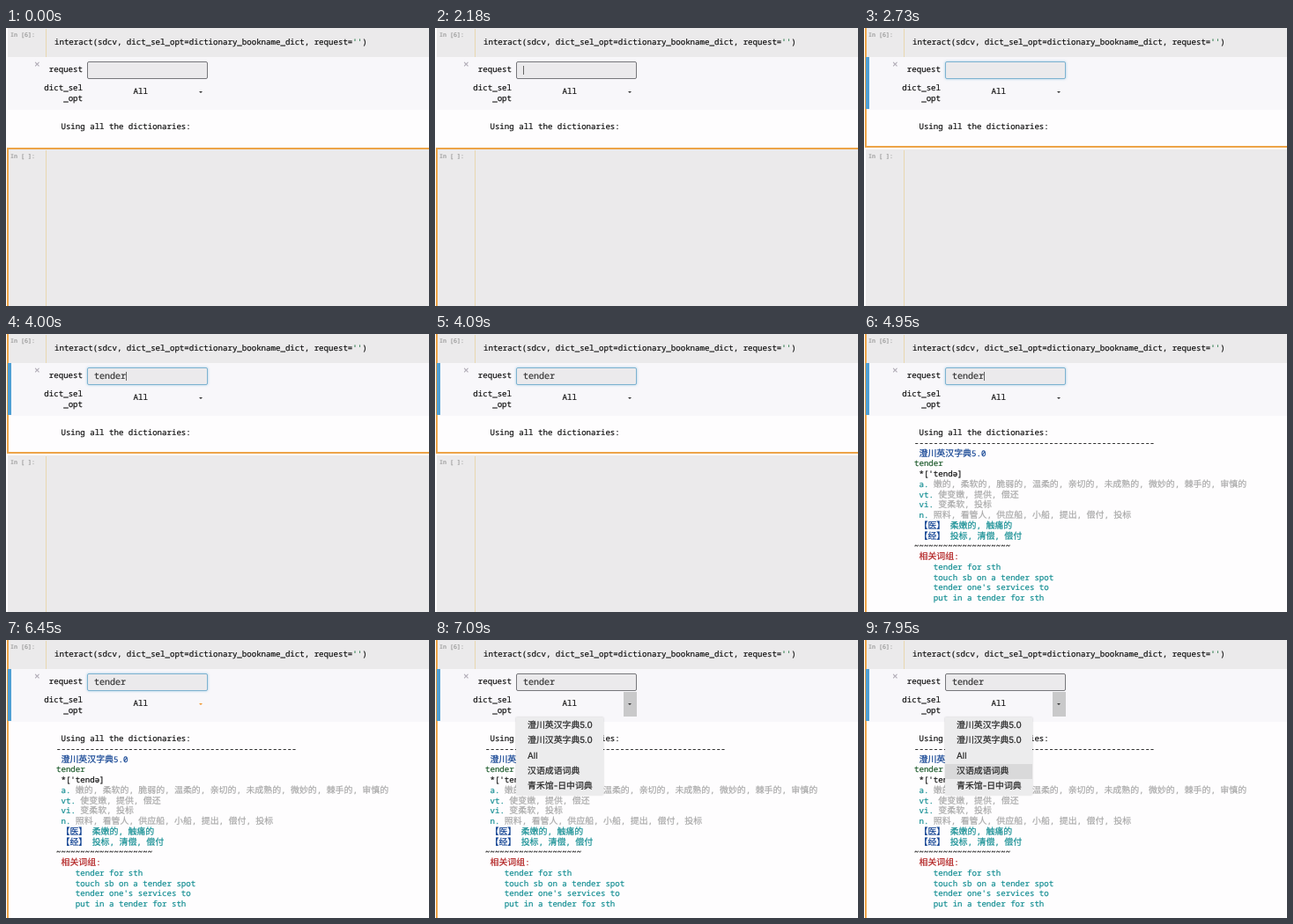
Write an HTML page that moves like this. It is 480 by 316 pixels and loops after 8000 ms.

```html
<!DOCTYPE html>
<html lang="zh-CN">
<head>
<meta charset="utf-8">
<title>Dictionary widget</title>
<style>
html, body { margin: 0; width: 100%; height: 100%; overflow: hidden; background: #fff; }
#stage { position: relative; width: 480px; height: 316px; overflow: hidden; background: #fefdfe;
  font: 9.1px/12px "Noto Sans Mono", monospace; color: #111; text-rendering: geometricPrecision;
  -webkit-text-stroke: 0.2px currentColor; }
#stage div, #stage pre { position: absolute; box-sizing: border-box; margin: 0; white-space: pre; }
#stage pre { font: inherit; line-height: 11.77px; }
.han { font: 9.93px/0 "Noto Sans CJK SC", "Noto Sans CJK", sans-serif; }
i { font-style: normal; }
.cyan { color: #128d92; } .gray { color: #a8a8a8; } .blue { color: #0a3d8f; }
.green { color: #1c5a2b; } .red { color: #b01c1c; }
.code { left: 2px; width: 478px; background: #ebeaeb; }
.gutter { left: 43px; top: 1px; bottom: 0; border-left: 1px solid #e8d8b0; }
.prompt { left: 5px; font-size: 6.67px; color: #999; }
.label { right: 393px; text-align: right; }
.selected { border: 2px solid #eda448; }
#widgets { left: 2px; top: 33px; width: 478px; height: 60px; background: #f8f7fa; }
#bar { left: 2px; top: 33px; width: 4px; height: 59px; background: #4f9fd4; }
#input { left: 92px; top: 38px; width: 137px; height: 20px; padding-left: 7px; border: 1px solid;
  border-radius: 2px; background: #ebeaec; font-size: 10px; line-height: 16px; color: #333; }
#caret { top: 4px; width: 1px; height: 10px; background: #666; }
#button { left: 214px; top: 59px; width: 15px; height: 28px; background: #c9c9ca; }
#arrow { left: 219px; top: 71.500px; border: 2.5px solid transparent; border-bottom: 0; }
#menu { left: 92px; top: 88px; width: 99px; height: 88px; background: #ececed;
  box-shadow: 0 0 2px #0003; }
#menu div { left: 0; width: 99px; height: 17.4px; padding-left: 13px;
  font: 9.9px/17.4px Inter, "Noto Sans CJK SC", "Noto Sans CJK", sans-serif; color: #222; }
</style>
</head>
<body>
<div id="stage">
  <div class="code" style="top:0;height:33px"><div class="gutter"></div></div>
  <div class="prompt" style="top:2px">In [6]:</div>
  <div style="left:55px;top:9.500px">interact(sdcv, dict_sel_opt=dictionary_bookname_dict, request=<i style="color:#1f7440">''</i>)</div>
  <div id="widgets"></div>
  <pre id="output" style="left:57px;top:106px"></pre>
  <div id="next" style="left:0;top:136px;width:480px;height:200px">
    <div class="code" style="top:2px;height:198px"><div class="gutter"></div></div>
    <div class="prompt" style="top:4px">In [ ]:</div>
    <div id="nextFrame" class="selected" style="left:1px;top:0;width:490px;height:210px"></div>
  </div>
  <div id="cellFrame" class="selected" style="left:1px;top:-5px;width:490px"></div>
  <div id="bar"></div>
  <div style="left:32px;top:36px;font-size:11px;color:#aaa5b0">×</div>
  <div class="label" style="top:40.500px">request</div>
  <div class="label" style="top:61.500px;line-height:12.5px">dict_sel
_opt</div>
  <div id="input"><span id="typed"></span><div id="caret"></div></div>
  <div style="left:144.500px;top:66px">All</div>
  <div id="button"></div>
  <div id="arrow"></div>
  <div id="menu"></div>
</div>
<script>
const LOOP = 8000, LINE = 11.77, WORD = 'tender';
const FOCUS = 2230, HOVER = 6410, OPEN = 6700;
const KEYS = [3000, 3140, 3280, 3420, 3560, 3700];
const MENU_HOVERS = [7250, 7400, 7550, 7750];
const $ = id => document.getElementById(id);
const paint = (color, text) => `<i class="${color}">${text}</i>`;
const sense = (kind, text) => ` ${paint('cyan', kind + '.')} ${paint('gray', text)}`;
const field = (name, text) => ` ${paint('blue', `【${name}】`)} ${paint('cyan', text)}`;
const entry = (word, sound, ...rest) => ['-'.repeat(50), ' ' + paint('blue', '澄川英汉字典5.0'),
  paint('green', word), ` *[${sound}]`, ...rest];

const results = [
  { at: 0, lines: [] },
  { at: 4400, lines: entry('tend', 'tend',
    sense('vi', '走向, 有某种的倾向, 易于, 照顾, 注意'),
    sense('vt', '照料, 护理')) },
  { at: 4770, lines: entry('tender', "'tendə",
    sense('a', '嫩的, 柔软的, 脆弱的, 温柔的, 亲切的, 未成熟的, 微妙的, 棘手的, 审慎的'),
    sense('vt', '使变嫩, 提供, 偿还'),
    sense('vi', '变柔软, 投标'),
    sense('n', '照料, 看管人, 供应船, 小船, 提出, 偿付, 投标'),
    field('医', '柔嫩的, 触痛的'),
    field('经', '投标, 清偿, 偿付'),
    '~'.repeat(20),
    ' ' + paint('red', '相关词组:'),
    ...['tender for sth', 'touch sb on a tender spot', "tender one's services to", 'put in a tender for sth']
      .map(phrase => '    ' + paint('cyan', phrase))) },
];
for (const result of results) {
  result.html = [' Using all the dictionaries:', ...result.lines].join('\n')
    .replace(/[\u3010\u3011\u4e00-\u9fff]+/g, '<span class="han">$&</span>');
}

const items = ['澄川英汉字典5.0', '澄川汉英字典5.0', 'All', '汉语成语词典', '青禾馆-日中词典'].map((name, i) => {
  const item = document.createElement('div');
  item.textContent = name;
  item.style.top = i * 17.4 + 0.8 + 'px';
  $('menu').append(item);
  return item;
});

const show = (id, on) => { $(id).style.visibility = on ? 'visible' : 'hidden'; };
const ramp = (t, start) => Math.min(1, Math.max(0, (t - start) / 200));
const mix = (a, b, k) => `rgb(${a.map((v, i) => v + (b[i] - v) * k)})`;
const mod = (a, n) => ((a % n) + n) % n;

function caretOn(t) {
  if (t < 2180 || t >= OPEN) return false;
  if (t < 3000) return t < 2700;
  return t < KEYS[5] || mod(t - 4480, 1000) < 540;
}

let shown;
function render(t) {
  const result = results.findLast(r => t >= r.at);
  if (result !== shown) {
    shown = result;
    $('output').innerHTML = result.html;
  }
  const extra = result.lines.length * LINE;
  $('next').style.top = 136 + extra + 'px';
  $('cellFrame').style.height = 141 + extra + 'px';

  const active = t >= FOCUS;
  show('cellFrame', active);
  show('bar', active);
  show('nextFrame', !active);

  const glow = ramp(t, FOCUS) - ramp(t, OPEN);
  $('input').style.borderColor = mix([118, 118, 122], [125, 178, 208], glow);
  $('input').style.boxShadow = `0 0 3px rgba(102,175,215,${0.6 * glow})`;
  const count = KEYS.filter(key => t >= key).length;
  $('typed').textContent = WORD.slice(0, count);
  $('caret').style.left = 7 + count * 6 + 'px';
  show('caret', caretOn(t));

  const open = t >= OPEN;
  show('button', open);
  show('menu', open);
  $('arrow').style.borderTopColor = t >= HOVER && !open ? '#f0952c' : '#333';
  const hovered = MENU_HOVERS.filter(time => t >= time).length - 1;
  items.forEach((item, i) => { item.style.background = i === hovered ? '#d9d9da' : 'none'; });
}

function tick() {
  render(performance.now() % LOOP);
  requestAnimationFrame(tick);
}
tick();
</script>
</body>
</html>
```
